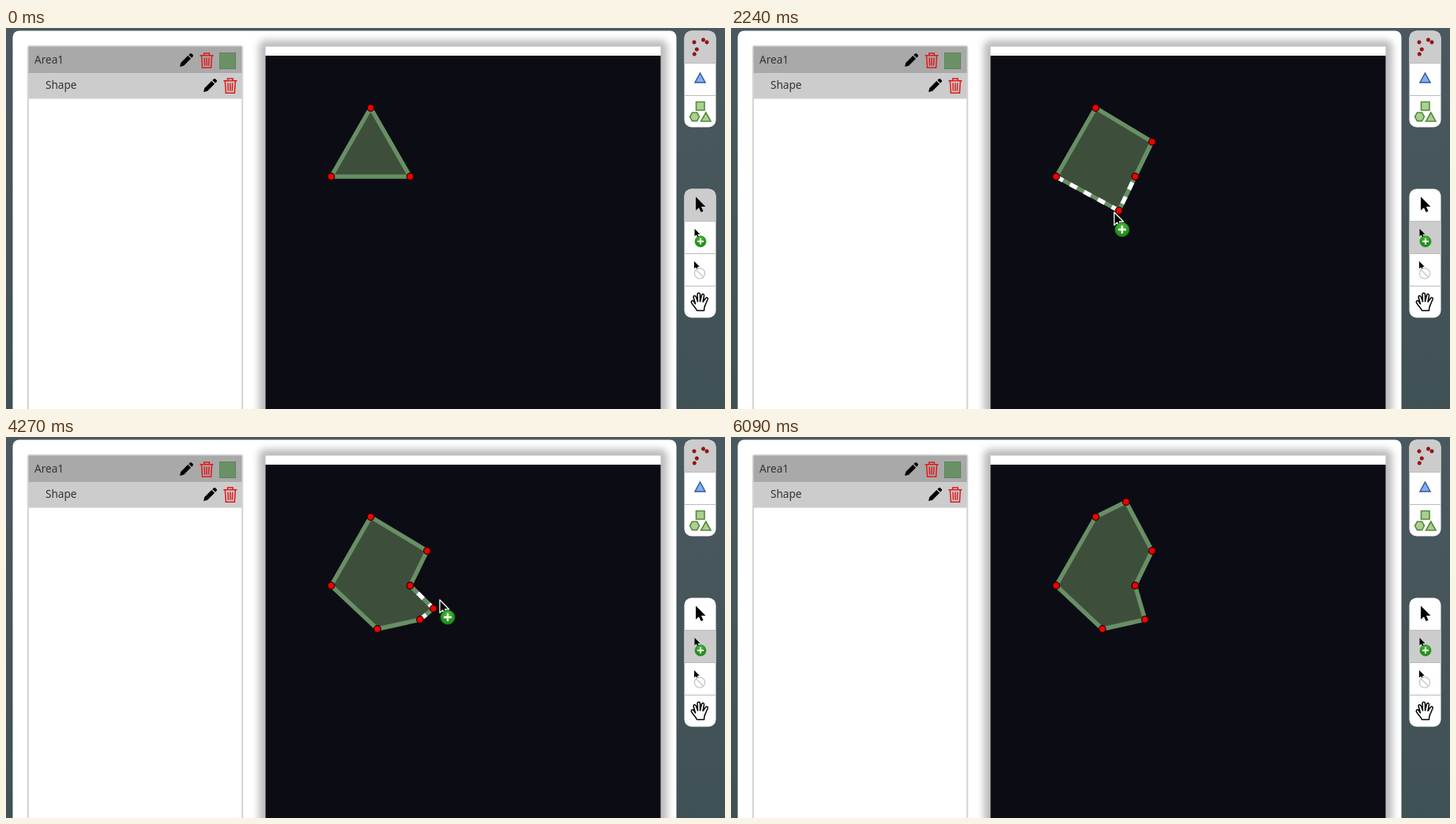
Animation, 910 px wide and 482 px high, one loop 6720 ms. Source, as an HTML page:

```html
<!DOCTYPE html>
<html lang="en">
<head>
<meta charset="utf-8">
<title>Shape editor</title>
<style>
  html, body { margin: 0; width: 100%; height: 100%; overflow: hidden; background: #44545a; }
  svg { display: block; width: 910px; height: 482px; }
  text { font: 13.6px "Noto Sans", "Open Sans", sans-serif; fill: #333; }
</style>
</head>
<body>
<svg viewBox="0 0 910 482" xmlns="http://www.w3.org/2000/svg">
  <defs>
    <linearGradient id="wall" x2="0" y2="1">
      <stop offset="0" stop-color="#4a595f"/><stop offset="1" stop-color="#405155"/>
    </linearGradient>
    <radialGradient id="green" cy=".3">
      <stop offset="0" stop-color="#4fbf3a"/><stop offset="1" stop-color="#22921d"/>
    </radialGradient>
    <filter id="glow" x="-20%" y="-20%" width="140%" height="140%"><feGaussianBlur stdDeviation="5"/></filter>
    <filter id="soft" x="-20%" y="-20%" width="140%" height="140%"><feGaussianBlur stdDeviation="1.3"/></filter>
    <clipPath id="barTop"><rect x="858.5" y="3.5" width="40" height="122" rx="9"/></clipPath>
    <clipPath id="barLow"><rect x="858.5" y="203.5" width="40" height="163" rx="9"/></clipPath>
    <clipPath id="paper"><rect x="328.5" y="35" width="500" height="447"/></clipPath>
    <path id="arrow" d="M0 0V16.5L3.8 13L6.3 18.5L9 17.3L6.6 12H11.8Z"/>
    <g id="badge">
      <circle r="9" fill="url(#green)" stroke="#1c7a18" stroke-width=".8"/>
      <path d="M-5 0H5M0 -5V5" stroke="#fff" stroke-width="2.3"/>
    </g>
    <g id="pencil">
      <path d="M0 17L1.2 12L10.2 3L14 6.8L5 15.8ZM11.2 2L13 .4Q14 -.4 15 .5L16.6 2.1Q17.4 3 16.6 4L15 5.8Z"/>
    </g>
    <g id="bin" fill="none" stroke="#e0191b" stroke-width="1.5">
      <path d="M0 3.8H17M5.2 3.5V1H11.8V3.5M2 4L3 19.2H14L15 4"/>
      <path d="M5.6 6.5L6 16.7M8.5 6.5V16.7M11.4 6.5L11 16.7"/>
    </g>
  </defs>

  <rect width="910" height="482" fill="url(#wall)"/>
  <rect x="8.5" y="3.5" width="840" height="500" rx="8" fill="#fff"/>

  <rect x="28" y="23" width="271" height="480" fill="#888" filter="url(#soft)"/>
  <rect x="28.5" y="23.5" width="270" height="470" fill="#fff"/>
  <rect x="28.5" y="23.5" width="270" height="34" fill="#a9a9a9"/>
  <rect x="28.5" y="57.5" width="270" height="32" fill="#ccc"/>
  <text x="36" y="44.5">Area1</text>
  <text x="50" y="76.5">Shape</text>
  <use href="#pencil" x="220" y="32"/>
  <use href="#bin" x="245.5" y="31"/>
  <rect x="270.5" y="31.5" width="20" height="20" fill="#6a9166" stroke="#5c8358"/>
  <use href="#pencil" x="250" y="64"/>
  <use href="#bin" x="275.3" y="63"/>

  <rect x="320" y="15.5" width="517" height="500" rx="8" fill="#bbb" filter="url(#glow)"/>
  <rect x="328.5" y="23.5" width="500" height="12" fill="#fff"/>
  <rect x="328.5" y="35" width="500" height="447" fill="#0c0d14"/>

  <g clip-path="url(#paper)" stroke-width="5.4">
    <path id="fill" fill="#3d4f3b"/>
    <path id="outline" fill="none" stroke="#688f65" stroke-linejoin="round"/>
    <path id="dashes" fill="none" stroke="#fff" stroke-dasharray="10 10"/>
    <g id="dots" fill="#f30000" stroke="#230000" stroke-width="1.2"></g>
  </g>

  <g clip-path="url(#barTop)">
    <rect x="858" y="3" width="41" height="123" fill="#fff"/>
    <rect x="858" y="3" width="41" height="41" fill="#ccc"/>
    <path d="M858 44.5H899M858 85.5H899" stroke="#bbb"/>
  </g>
  <g fill="#a11212" stroke="#700" stroke-width=".6">
    <circle cx="871" cy="18" r="2.2"/><circle cx="882.5" cy="15" r="2.2"/><circle cx="887" cy="18" r="2.2"/>
    <circle cx="874.3" cy="27" r="2.2"/><circle cx="871.3" cy="33" r="2.2"/>
  </g>
  <path d="M878.5 57L885 69H872Z" fill="#86aeea" stroke="#315aa5" stroke-width="1.5"/>
  <path d="M873.5 93.5H884V104H873.5ZM868.5 107H874.5L877.5 112.3L874.5 117.6H868.5L865.5 112.3ZM885.8 107L892 118H879.6Z"
        fill="#accf91" stroke="#548a3b" stroke-width="1.6"/>

  <g clip-path="url(#barLow)">
    <rect x="858" y="203" width="41" height="164" fill="#fff"/>
    <rect id="active" x="858" width="41" height="41" fill="#ccc"/>
    <path d="M858 244.5H899M858 285.5H899M858 326.5H899" stroke="#bbb"/>
  </g>
  <use href="#arrow" transform="translate(873 213.5) scale(1.05)"/>
  <use href="#arrow" transform="translate(871.5 254) scale(.58)"/>
  <use href="#badge" transform="translate(879 270) scale(.78)"/>
  <use href="#arrow" transform="translate(871 295) scale(.58)"/>
  <g fill="#fff" stroke="#c8c8c8" stroke-width="1.4"><circle cx="878" cy="310.5" r="6.6"/><path d="M873.4 306L882.6 315"/></g>
  <path transform="translate(866.5 334.5)" fill="#fff" stroke="#000" stroke-width="1.5" stroke-linejoin="round"
        d="M8 23C6 18 2 16 .8 12.500C.8 10 3 10 4 11.500L6 14.500L3.600 6C3.500 3.500 6 3.500 7 6L9 11.500L8.500 2.500C9 0 11.500 0 12 2.500V11.500L14 3.500C15 1 17.500 2 17 4.500L15.500 12L18.500 8C20 5.500 22.500 6.500 21.500 9L18.500 16C17 18.500 17 20 17 23Z"/>

  <circle id="ring" r="40" fill="none" stroke="#8a8a8a" stroke-width="2.5" opacity=".75"/>
  <g id="cursor">
    <use href="#arrow" stroke="#fff" stroke-width="1.3" stroke-linejoin="round"/>
    <use id="plus" href="#badge" x="10" y="22"/>
  </g>
</svg>
<script>
const LOOP = 6720, STEP = 70, TOOL_ON = 700, LEAVE = 6090;
const $ = id => document.getElementById(id);

// Pointer path: time, x, y
const path = [
  [0, 290, 482], [70, 330, 470], [350, 820, 290], [420, 858, 277], [700, 858, 277],
  [840, 680, 262], [980, 522, 226], [1050, 523, 222], [1260, 532, 150], [1330, 533, 144],
  [1540, 533, 144], [1820, 534, 192], [1890, 534, 192], [2170, 491, 231], [2240, 485, 233],
  [2590, 470, 243], [2730, 470, 243], [2940, 531, 221], [3010, 534, 218], [3150, 549, 205],
  [3220, 549, 205], [3850, 524, 231], [4060, 524, 231], [4200, 541, 217], [4270, 549, 206],
  [4480, 572, 170], [4760, 556, 115], [5110, 515, 45], [5320, 498, 83], [5390, 498, 80],
  [5460, 500, 82], [5670, 500, 82], [6090, 276, 482]
];

// Mouse presses: down, up, x, y
const presses = [
  [630, 700, 858, 277], [1400, 1540, 533, 144], [2660, 2800, 470, 243],
  [3990, 4130, 524, 231], [5600, 5740, 500, 82]
];

function pointerAt(t) {
  const i = path.findIndex(k => k[0] >= t);
  if (i <= 0) return path[i ? path.length - 1 : 0].slice(1);
  const [t0, x0, y0] = path[i - 1], [t1, x1, y1] = path[i];
  const p = (t - t0) / (t1 - t0);
  return [x0 + (x1 - x0) * p, y0 + (y1 - y0) * p];
}

function distance([x, y], [ax, ay], [bx, by]) {
  const dx = bx - ax, dy = by - ay;
  const p = Math.max(0, Math.min(1, ((x - ax) * dx + (y - ay) * dy) / (dx * dx + dy * dy)));
  return Math.hypot(x - ax - dx * p, y - ay - dy * p);
}

// Index of the corner that starts the edge closest to a point
function nearestEdge(shape, point) {
  let best = 0, least = Infinity;
  shape.forEach((a, i) => {
    const d = distance(point, a, shape[(i + 1) % shape.length]);
    if (d <= least) { least = d; best = i; }
  });
  return best;
}

function insert(shape, point) {
  const i = nearestEdge(shape, point);
  shape.splice(i + 1, 0, point);
  return i + 1;
}

const onPaper = ([x, y]) => x > 328 && x < 829 && y > 24 && y < 482;
const line = points => "M" + points.map(p => p.join(" ")).join("L");
const show = (el, on) => el.setAttribute("visibility", on ? "visible" : "hidden");

const dots = Array.from({ length: 8 }, () =>
  $("dots").appendChild(document.createElementNS("http://www.w3.org/2000/svg", "circle")));

function draw(time) {
  const t = Math.floor(time % LOOP / STEP) * STEP;
  const tip = pointerAt(t), hover = pointerAt(t - STEP);
  const adding = t >= TOOL_ON, present = t > 0 && t < LEAVE;

  const shape = [[411.5, 188], [511.5, 188], [461.5, 101]];
  for (const [, up, x, y] of presses.slice(1)) if (t >= up) insert(shape, [x, y]);

  // The corner being placed trails the pointer by one step
  const preview = adding && present && onPaper(hover) && onPaper(tip);
  let dashed = "";
  if (preview) {
    const i = insert(shape, hover);
    dashed = line([shape[i - 1], hover, shape[(i + 1) % shape.length]]);
  }
  const closed = line(shape) + "Z";
  $("fill").setAttribute("d", closed);
  $("outline").setAttribute("d", closed);
  $("dashes").setAttribute("d", dashed);
  dots.forEach((dot, i) => {
    const [x, y] = shape[i] || [0, 0];
    dot.setAttribute("cx", x);
    dot.setAttribute("cy", y);
    dot.setAttribute("r", shape[i] ? 4.3 : 0);
  });

  $("active").setAttribute("y", adding ? 244.5 : 203.5);
  $("cursor").setAttribute("transform", `translate(${tip})`);
  show($("cursor"), present);
  show($("plus"), present && adding && onPaper(tip));

  const press = presses.find(([down, up]) => t >= down && t < up);
  show($("ring"), press);
  if (press) $("ring").setAttribute("transform", `translate(${press.slice(2)})`);
}

const start = performance.now();
function tick() {
  draw(performance.now() - start);
  requestAnimationFrame(tick);
}
tick();
</script>
</body>
</html>
```
